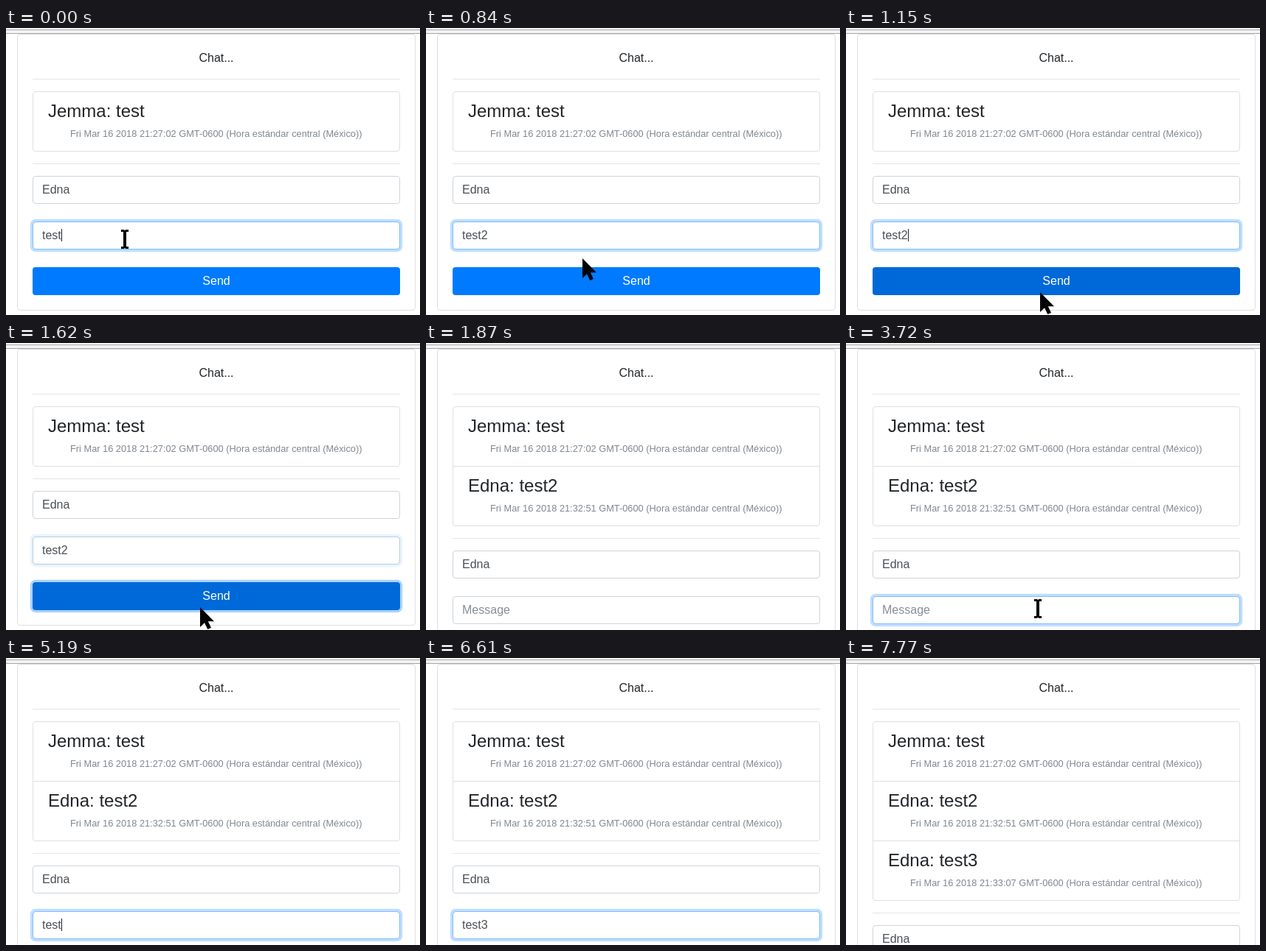
An HTML page that plays this animation: 561 by 390 pixels, repeating every 8.08 s.

```html
<!DOCTYPE html>
<html lang="en">
<head>
<meta charset="utf-8">
<title>Chat</title>
<style>
  html, body { margin: 0; width: 100%; height: 100%; overflow: hidden; background: #fff; }
  svg { display: block; width: 561px; height: 390px; }
  text { font: 16px "Liberation Sans", Arial, sans-serif; fill: #212529; white-space: pre; }
  .mid { text-anchor: middle; }
  .name { font-size: 24px; }
  .date { font-size: 12.8px; fill: #7f8890; }
  .box { fill: #fff; stroke: #dfdfdf; }
  .rule { fill: #e5e5e5; }
  .field { fill: #fff; stroke: #ced4da; }
  .value { fill: #495057; }
  .hint { fill: #868e96; }
</style>
</head>
<body>
<svg viewBox="0 0 561 390">
  <rect width="561" height="390" fill="#fff"/>
  <rect y="2" width="561" height="1" fill="#a6a6a6"/>
  <rect y="3" width="561" height="4" fill="#f3f3f3"/>
  <rect y="7" width="561" height="1" fill="#a6a6a6"/>
  <rect id="card" class="box" x="15.5" y="8.5" width="539" rx="3.5"/>
  <text class="mid" x="285" y="46">Chat...</text>
  <rect class="rule" x="36" y="69" width="498" height="1"/>
  <rect id="list" class="box" x="36.5" y="86.5" width="497" rx="3.5"/>
  <g id="rows"></g>
  <g id="form">
    <rect class="rule" x="36" y="184" width="498" height="1"/>
    <rect class="field" x="36.5" y="201.5" width="497" height="37" rx="3.5"/>
    <text class="value" x="49" y="225">Edna</text>
    <rect class="field" x="36.5" y="263.5" width="497" height="37" rx="3.5"/>
    <g id="focus" fill="none">
      <rect x="34.4" y="261.4" width="501.2" height="41.2" rx="5.6" stroke="#bfdeff" stroke-width="3.2"/>
      <rect x="36.5" y="263.5" width="497" height="37" rx="3.5" stroke="#80bdff"/>
    </g>
    <text id="msg" x="49" y="287"></text>
    <rect id="caret" y="273" width="1" height="17" fill="#212529"/>
    <rect id="ring" x="34.4" y="323.4" width="501.2" height="41.2" rx="5.6" fill="none" stroke="#80bdff" stroke-width="3.2"/>
    <rect id="btn" x="36" y="325" width="498" height="38" rx="4"/>
    <text class="mid" x="285" y="349" style="fill:#fff">Send</text>
  </g>
  <g id="pointer">
    <path id="arrow" d="M0 0V27L6 21.3L10.3 30L15 28L10.8 19.3H19Z"/>
    <path id="beam" d="M-5 -13H-1.5L0 -12L1.5 -13H5V-10H2V10H5V13H1.5L0 12L-1.5 13H-5V10H-2V-10H-5Z"/>
  </g>
</svg>
<script>
const LOOP = 8080, ROW = 81, BLINK = 530, FADE = 150, KEY = 80;

// moments of the story, in ms
const DIGIT = 70, CLICK = 1550, SENT = 1870, FOCUS = 3180;
const TYPE = 4820, TYPED = TYPE + 3 * KEY, DIGIT2 = 6070, CLICK2 = 7180, SENT2 = 7770;

const $ = id => document.getElementById(id);
const set = (id, attrs) => {
  for (const k in attrs) $(id).setAttribute(k, attrs[k]);
};
const show = (id, on) => set(id, { visibility: on ? 'visible' : 'hidden' });
const ramp = (t, from, ms) => Math.min(1, Math.max(0, (t - from) / ms));
const ease = p => p * p * (3 - 2 * p);

const row = (name, text, time, i) => `
  <g id="row${i}" transform="translate(0 ${i * ROW})">
    ${i ? '<rect x="37" y="86" width="496" height="1" fill="#dfdfdf"/>' : ''}
    <text class="name" x="57" y="121">${name}: ${text}</text>
    <text class="date" x="87" y="148">Fri Mar 16 2018 ${time} GMT-0600 (Hora estándar central (México))</text>
  </g>`;
$('rows').innerHTML = row('Jemma', 'test', '21:27:02', 0) +
  row('Edna', 'test2', '21:32:51', 1) + row('Edna', 'test3', '21:33:07', 2);

// the pointer glides from stop to stop; y past 390 is off stage
const stops = [
  { at: 0, ms: 1, x: 161, y: 287 },
  { at: DIGIT, ms: 400, x: 210, y: 311 },
  { at: 800, ms: 350, x: 263, y: 359 },
  { at: SENT - 1, ms: 1, x: 265, y: 395 },
  { at: 2850, ms: 300, x: 260, y: 361 },
  { at: 4150, ms: 250, x: 270, y: 373 },
  { at: 4700, ms: 150, x: 268, y: 395 },
  { at: 5880, ms: 50, x: 340, y: 384 },
  { at: 5950, ms: 100, x: 311, y: 395 }
];

function pointerAt(t) {
  let x = stops[0].x, y = stops[0].y;
  for (const s of stops) {
    const p = ease(ramp(t, s.at, s.ms));
    x += (s.x - x) * p;
    y += (s.y - y) * p;
  }
  return [Math.round(x), Math.round(y)];
}

function typed(t) {
  if (t < DIGIT) return 'test';
  if (t < SENT) return 'test2';
  if (t < DIGIT2) return 'test'.slice(0, Math.max(0, Math.floor((t - TYPE) / KEY) + 1));
  return t < SENT2 ? 'test3' : '';
}

// the caret blinks evenly, starting over at each input
function caretOn(t) {
  const focused = t < CLICK || (t >= FOCUS && t < CLICK2);
  const last = Math.max(...[0, FOCUS, TYPE, TYPED, DIGIT2].filter(k => k <= t));
  return focused && (t - last) % (2 * BLINK) < BLINK;
}

function draw(t) {
  const count = 1 + (t >= SENT) + (t >= SENT2);
  const shift = (count - 1) * ROW;
  set('card', { height: 375 + shift });
  set('list', { height: count * ROW });
  set('form', { transform: `translate(0 ${shift})` });
  for (let i = 0; i < 3; i++) show('row' + i, i < count);

  const value = typed(t);
  $('msg').textContent = value || 'Message';
  set('msg', { class: value ? 'value' : 'hint' });
  set('caret', { x: Math.round(49 + (value && $('msg').getComputedTextLength())) });
  show('caret', caretOn(t));

  const blur = ramp(t, CLICK - 30, FADE);
  set('focus', { opacity: 1 - blur + ramp(t, FOCUS, FADE) - ramp(t, CLICK2, FADE) });
  set('ring', { opacity: t < SENT ? blur : 0 });

  const [x, y] = pointerAt(t);
  const over = top => y >= top + shift && y < top + 38 + shift;
  set('pointer', { transform: `translate(${x} ${y})` });
  show('beam', over(263));
  show('arrow', !over(263));
  set('btn', { fill: over(325) ? '#0069d9' : '#007bff' });
}

const start = performance.now();
function tick(now) {
  draw(Math.max(0, now - start) % LOOP);
  requestAnimationFrame(tick);
}
draw(0);
requestAnimationFrame(tick);
</script>
</body>
</html>
```
